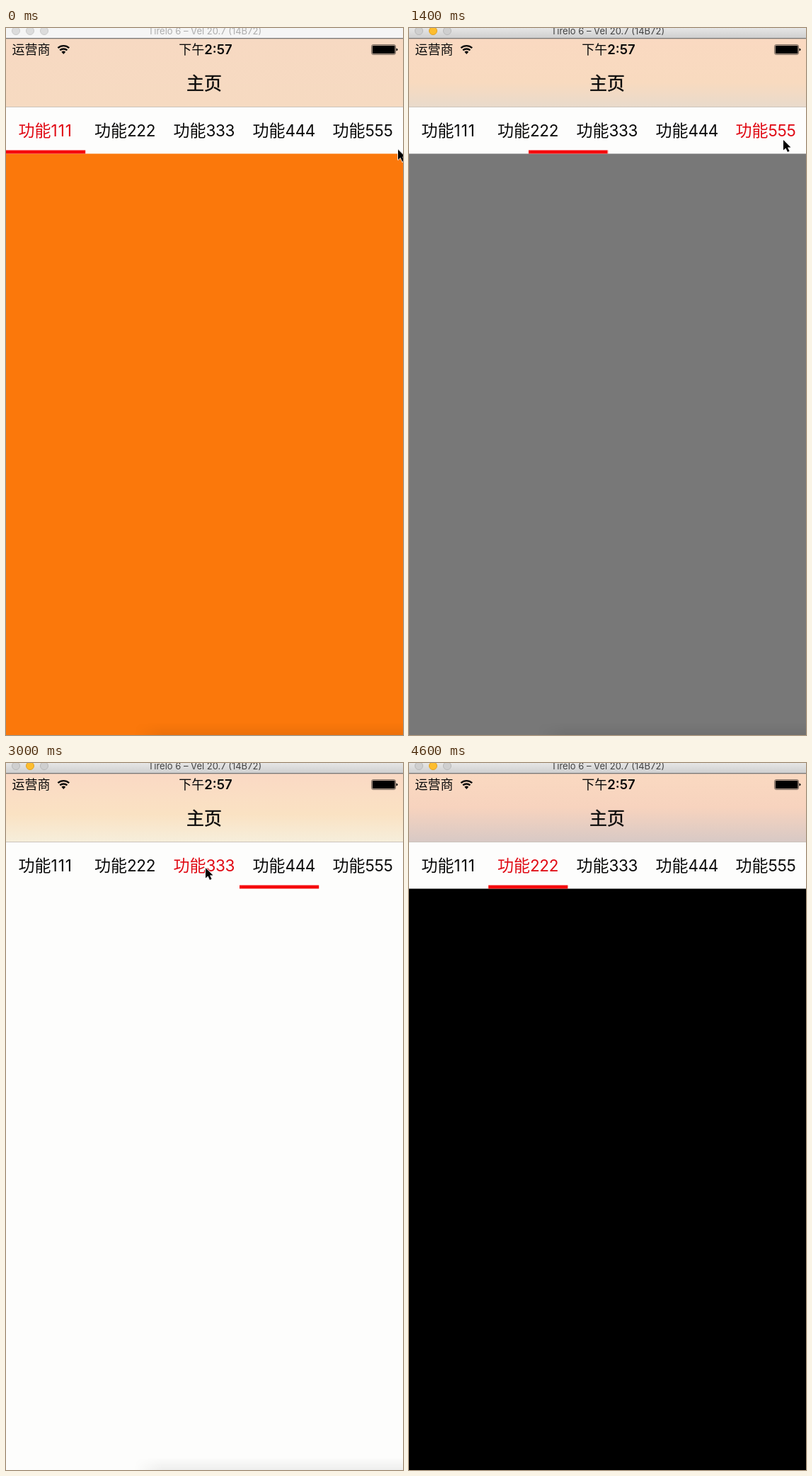
Write an HTML page that moves like this. It is 561 by 998 pixels and loops after 4800 ms.

```html
<!DOCTYPE html>
<html lang="zh-CN">
<head>
<meta charset="utf-8">
<title>主页</title>
<style>
html, body { margin: 0; width: 100%; height: 100%; overflow: hidden; }
#stage { position: relative; width: 561px; height: 998px; overflow: hidden; }
#stage > * { position: absolute; left: 0; width: 561px; }

/* every change is a hard cut, held until the next one */
.bar, .nav, .page, .ink, .dot, .tab, .line, .cursor { animation: 4.8s step-end infinite; }

.bar { top: 0; height: 14px; animation-name: bar; }
.nav { top: 15px; height: 96px; animation-name: nav; }
.edge { top: 14px; height: 2px; background: linear-gradient(#777 50%, rgba(119, 119, 119, .3) 50%); }
.rule { top: 111px; height: 1px; background: #cbc3bb; }
.tabs { top: 112px; height: 65px; background: #fdfdfc; }
.page {
  top: 177px; height: 821px; animation-name: page;
  box-shadow: inset 0 1px rgba(253, 253, 252, .45);
}
#stage > .shade {
  left: 181px; width: 380px; top: 980px; height: 18px;
  background: linear-gradient(transparent, rgba(0, 0, 0, .06));
  -webkit-mask-image: linear-gradient(90deg, transparent, #000 40px);
  mask-image: linear-gradient(90deg, transparent, #000 40px);
}
svg { top: 0; height: 998px; }

text { font-family: Inter, "Noto Sans CJK SC", "Noto Sans CJK", sans-serif; fill: #0a0a0a; }
.mid { text-anchor: middle; }
.ink { font-size: 13px; animation-name: ink; }
.status { font-size: 18px; }
.clock { font-weight: 500; }
.clock tspan { font-size: 18.5px; font-weight: 600; }
.title { font-size: 25px; font-weight: 500; stroke: #0a0a0a; stroke-width: .4px; }
.tab { font-size: 23px; }
.tab tspan { font-size: 22.5px; letter-spacing: -.4px; }
.tab1 { animation-name: tab1; }
.tab1 tspan { letter-spacing: 1px; }
.tab2 { animation-name: tab2; }
.tab3 { animation-name: tab3; }
.tab5 { animation-name: tab5; }
.dot { fill: #cfcfcf; stroke: #b9b9b9; animation-name: dot; }
.dot.lit { animation-name: lit; }
.line { fill: #f50a0c; animation-name: line; }
.cursor { animation-name: cursor; }

@keyframes bar {
  0% { background: #f5f5f5; }
  4.166% { background: linear-gradient(#e6e6e6, #cfcfcf); }
}
@keyframes ink { 0% { fill: #adadad; } 4.166% { fill: #424242; } }
@keyframes dot {
  0% { fill: #dcdcdc; stroke: #cacaca; }
  4.166% { fill: #cfcfcf; stroke: #b9b9b9; }
}
@keyframes lit {
  0% { fill: #dcdcdc; stroke: #cacaca; }
  4.166% { fill: #fdbd2e; stroke: #e0a225; }
}
@keyframes page {
  0% { background: #fb780b; }
  16.666% { background: #000; }
  29.166% { background: #787878; }
  62.5% { background: #fdfdfc; }
  75% { background: #000; }
}
@keyframes nav {
  0% { background: linear-gradient(#f7d9c2, #f6dac1); }
  16.666% { background: linear-gradient(#fad9c1, #f7d3be 50%, #d8c9c5); }
  29.166% { background: linear-gradient(#fad9c1, #f8dabf 65%, #e9dacb); }
  62.5% { background: linear-gradient(#fad9c4, #fae2c3 60%, #f6eedb); }
  75% { background: linear-gradient(#fad9c1, #f7d3be 50%, #d8c9c5); }
}
@keyframes tab1 { 0% { fill: #e00a14; } 16.666% { fill: #0a0a0a; } }
@keyframes tab2 {
  0% { fill: #0a0a0a; }
  16.666% { fill: #e00a14; }
  29.166% { fill: #0a0a0a; }
  75% { fill: #e00a14; }
}
@keyframes tab3 { 0% { fill: #0a0a0a; } 62.5% { fill: #e00a14; } 75% { fill: #0a0a0a; } }
@keyframes tab5 { 0% { fill: #0a0a0a; } 29.166% { fill: #e00a14; } 62.5% { fill: #0a0a0a; } }
@keyframes line {
  0% { transform: translateX(0); }
  16.666% { transform: translateX(62px); }
  20.833% { transform: translateX(112.2px); }
  29.166% { transform: translateX(168.5px); }
  33.333% { transform: translateX(449px); }
  62.5% { transform: translateX(330px); }
  66.666% { transform: translateX(224.4px); }
  75% { transform: translateX(215px); }
  79.166% { transform: translateX(112.2px); }
}
@keyframes cursor {
  0% { transform: translate(554px, 171.5px); }
  4.166% { transform: translate(530px, 165px); }
  8.333% { transform: translate(420px, 155px); }
  12.5% { transform: translate(236px, 150px); }
  16.666% { transform: translate(216.5px, 145px); }
  20.833% { transform: translate(330px, 150px); }
  25% { transform: translate(529px, 158px); }
  37.5% { transform: translate(522px, 152px); }
  41.666% { transform: translate(508px, 144px); }
  45.833% { transform: translate(484px, 144px); }
  50% { transform: translate(430px, 147px); }
  54.166% { transform: translate(350px, 147px); }
  58.333% { transform: translate(290.5px, 141.5px); }
  62.5% { transform: translate(282px, 148px); }
  66.666% { transform: translate(230px, 153px); }
  70.833% { transform: translate(159px, 147.5px); }
  75% { transform: translate(158px, 154.5px); visibility: visible; }
  83.333% { transform: translate(158px, 154.5px); visibility: hidden; }
}
</style>
</head>
<body>
<div id="stage">
  <div class="bar"></div>
  <div class="nav"></div>
  <div class="edge"></div>
  <div class="rule"></div>
  <div class="tabs"></div>
  <div class="page"></div>
  <div class="shade"></div>
  <svg viewBox="0 0 561 998">
    <circle class="dot" cx="14" cy="4" r="5.5"/>
    <circle class="dot lit" cx="34" cy="4" r="5.5"/>
    <circle class="dot" cx="54" cy="4" r="5.5"/>
    <text class="ink mid" x="281" y="9">Tirelo 6 – Vel 20.7 (14B72)</text>

    <text class="status" x="8.5" y="37">运营商</text>
    <g transform="translate(81.3 37)" fill="none" stroke="#0a0a0a" stroke-width="2.4">
      <path d="M-7.9-8.8A11.8 11.8 0 0 1 7.9-8.8M-5.1-5.6A7.6 7.6 0 0 1 5.1-5.6"/>
      <path d="M0 0L-2.9-3.2A4.3 4.3 0 0 1 2.9-3.2Z" fill="#0a0a0a" stroke="none"/>
    </g>
    <text class="status clock mid" x="282" y="37">下午<tspan>2:57</tspan></text>
    <rect x="516.5" y="23.5" width="34" height="14" rx="2.5" fill="none" stroke="#000" stroke-opacity=".5"/>
    <rect x="517.7" y="24.7" width="31.8" height="11.6" rx="1.2"/>
    <path d="M551.5 28.5q2 .6 2 2t-2 2z"/>
    <text class="title mid" x="280" y="86.8">主页</text>

    <text class="tab tab1" x="17.5" y="152.5">功能<tspan>111</tspan></text>
    <text class="tab tab2" x="125" y="152.5">功能<tspan>222</tspan></text>
    <text class="tab tab3" x="236.5" y="152.5">功能<tspan>333</tspan></text>
    <text class="tab" x="348.5" y="152.5">功能<tspan>444</tspan></text>
    <text class="tab tab5" x="461.5" y="152.5">功能<tspan>555</tspan></text>
    <rect class="line" y="172.5" width="112.2" height="4.9"/>
    <path class="cursor" d="M0 0V14.5L3.4 11.4L6 17L8.6 15.8L6 10.4H10.5Z"
      stroke="#fff" stroke-width="1.6" paint-order="stroke" stroke-linejoin="round"/>
  </svg>
</div>
</body>
</html>
```
